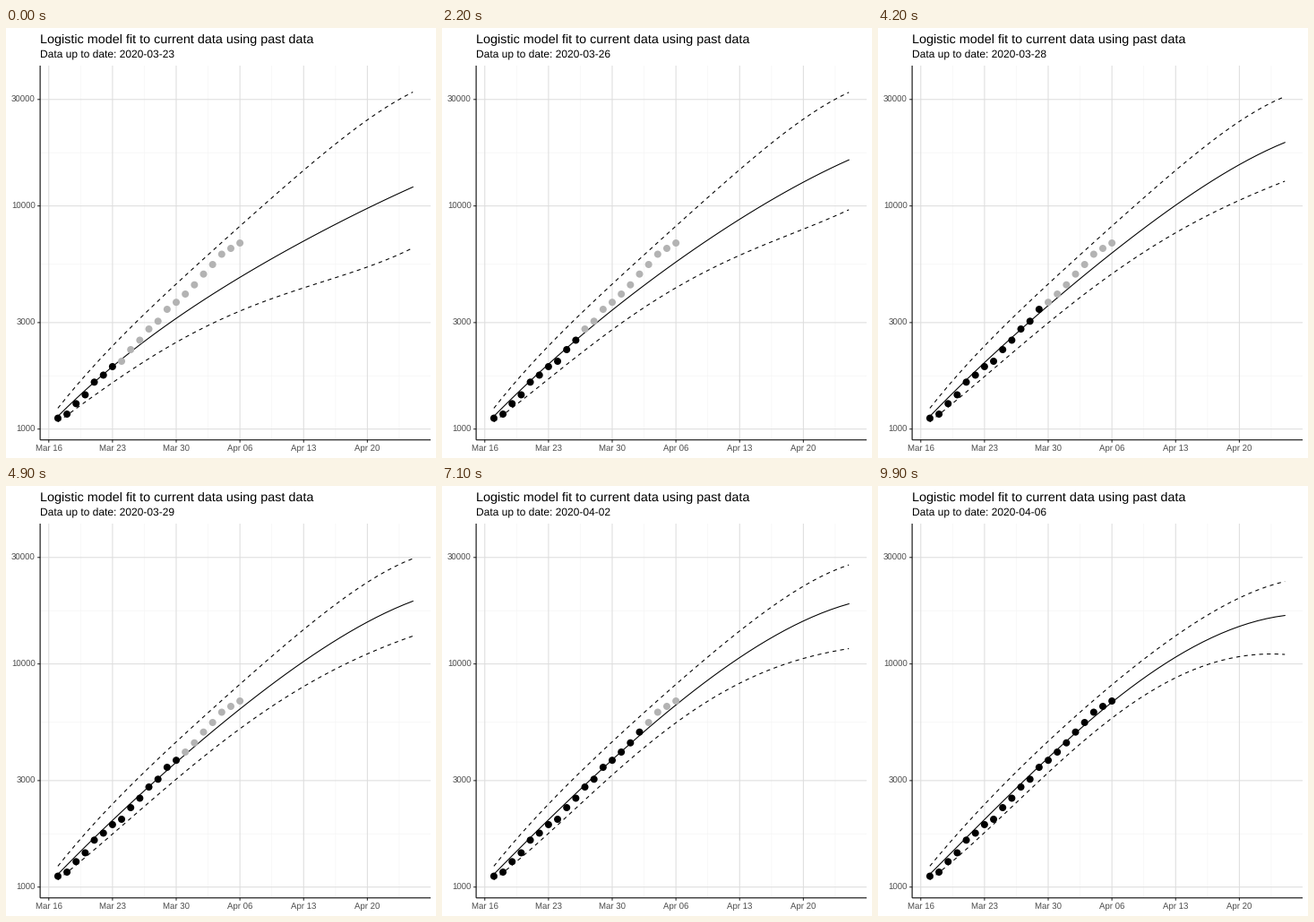
Write a matplotlib script that moves like this. It is 480 px wide and 480 px high and loops after 10 s.

```python
import matplotlib.pyplot as plt
import numpy as np
from matplotlib.animation import FuncAnimation

SIZE, DPI = 480, 72
FRAMES, INTERVAL, LAST_STEP = 100, 100, 14
FIRST = np.datetime64("2020-03-23")
DAY = 10.161                      # pixels per day
LEFT, RIGHT, TOP, BOTTOM = 38.1, 474, 42, 459.8
MAJOR, MINOR = "#dedede", "#f4f4f4"

plt.rcParams.update({
    "font.family": "Liberation Sans",
    "text.hinting": "none",
    "path.snap": False,
})

CASES = [1119, 1167, 1300, 1424, 1623, 1745, 1905, 2013, 2270, 2502, 2808,
         3043, 3441, 3699, 4027, 4429, 4949, 5463, 6076, 6452, 6820]

# start: settled heights on the early knots; drift: initial offset by Apr 06
# bow: bend of the tail and its growth per step; ends: final height over time
START_DAYS = np.array([1, 7, 14, 21])
END_STEPS = [0, 5, 7, 10, 12, 14]
BANDS = [
    dict(style="-", start=[433.5, 371, 303, 237], drift=41, bow=(3, 0.75),
         ends=[177.5, 127, 128.5, 131.5, 129.5, 144.5]),
    dict(style=(0, (4, 4)), start=[424.5, 354.5, 286.5, 220.5], drift=0, bow=(6.5, 0.3),
         ends=[71.5, 72, 81, 88, 88, 106.5]),
    dict(style=(0, (4, 4)), start=[439.5, 386, 317.5, 254], drift=62.5, bow=(0.5, 1.3),
         ends=[245.5, 174.5, 167.5, 181.5, 178, 188]),
]
days = np.arange(1, 41)


def day_x(day):
    """Horizontal position of a day counted from March 16."""
    return 47.75 + DAY * np.asarray(day)


def case_y(cases):
    """Vertical position on the log scale."""
    return 447.7 - 249.1 * (np.log10(cases) - 3)


def forecast(band, step):
    """Heights of one band: an early part that settles and a bending tail."""
    offset = band["drift"] * np.exp(-step / 5.5)
    early = band["start"] + offset * ((START_DAYS - 1) / 20) ** 1.5
    end = np.interp(step, END_STEPS, band["ends"])
    base, growth = band["bow"]
    late = np.interp(28, [21, 40], [early[-1], end]) - base - growth * step
    knots = [*START_DAYS, 28, 40]
    return np.polyval(np.polyfit(knots, [*early, late, end], 4), days)


fig = plt.figure(figsize=(SIZE / DPI, SIZE / DPI), dpi=DPI, facecolor="white")
ax = fig.add_axes([0, 0, 1, 1])
ax.set(xlim=(0, SIZE), ylim=(SIZE, 0))
ax.axis("off")


def segment(x, y, color, width=1.07, z=1.5):
    ax.plot(x, y, color=color, lw=width, zorder=z, solid_capstyle="butt")


def draw_axes():
    breaks = np.array([1000, 3000, 10000, 30000])
    heights = case_y(breaks)
    for x in day_x(np.arange(3.5, 42, 7)):
        segment([x, x], [TOP, BOTTOM], MINOR, 0.6, z=1)
    for y in (heights[1:] + heights[:-1]) / 2:
        segment([LEFT, RIGHT], [y, y], MINOR, 0.6, z=1)

    names = ["Mar 16", "Mar 23", "Mar 30", "Apr 06", "Apr 13", "Apr 20"]
    for x, name in zip(day_x(np.arange(0, 36, 7)), names):
        segment([x, x], [TOP, BOTTOM], MAJOR)
        segment([x, x], [BOTTOM, BOTTOM + 3], "#333333", z=4)
        ax.text(x, 472.7, name, size=9.6, color="#4d4d4d", ha="center")
    for y, value in zip(heights, breaks):
        segment([LEFT, RIGHT], [y, y], MAJOR)
        segment([LEFT - 3, LEFT], [y, y], "#333333", z=4)
        ax.text(32.7, y + 3.4, str(value), size=9.6, color="#4d4d4d", ha="right")

    segment([LEFT, LEFT], [TOP, BOTTOM], "black", z=4)
    segment([LEFT, RIGHT], [BOTTOM, BOTTOM], "black", z=4)


draw_axes()
ax.text(LEFT, 17, "Logistic model fit to current data using past data", size=14.4)
subtitle = ax.text(LEFT, 34, "", size=12)

lines = [ax.plot([], [], color="black", lw=1.07, ls=band["style"], zorder=2)[0]
         for band in BANDS]
dots = ax.scatter(day_x(np.arange(1, len(CASES) + 1)), case_y(CASES),
                  s=8 ** 2, linewidths=0, zorder=3)


def update(frame):
    # Data switches at the nearest frame, the date only once it is reached
    step = (LAST_STEP * frame + LAST_STEP // 2) // (FRAMES - 1)
    shown = LAST_STEP * frame // (FRAMES - 1)
    for line, band in zip(lines, BANDS):
        line.set_data(day_x(days), forecast(band, step))
    known = step + 7
    dots.set_facecolor(["black"] * known + ["#b3b3b3"] * (len(CASES) - known))
    subtitle.set_text(f"Data up to date: {FIRST + shown}")
    return [*lines, dots, subtitle]


anim = FuncAnimation(fig, update, frames=FRAMES, interval=INTERVAL,
                     repeat=True, repeat_delay=0, blit=False)
plt.show()
```
